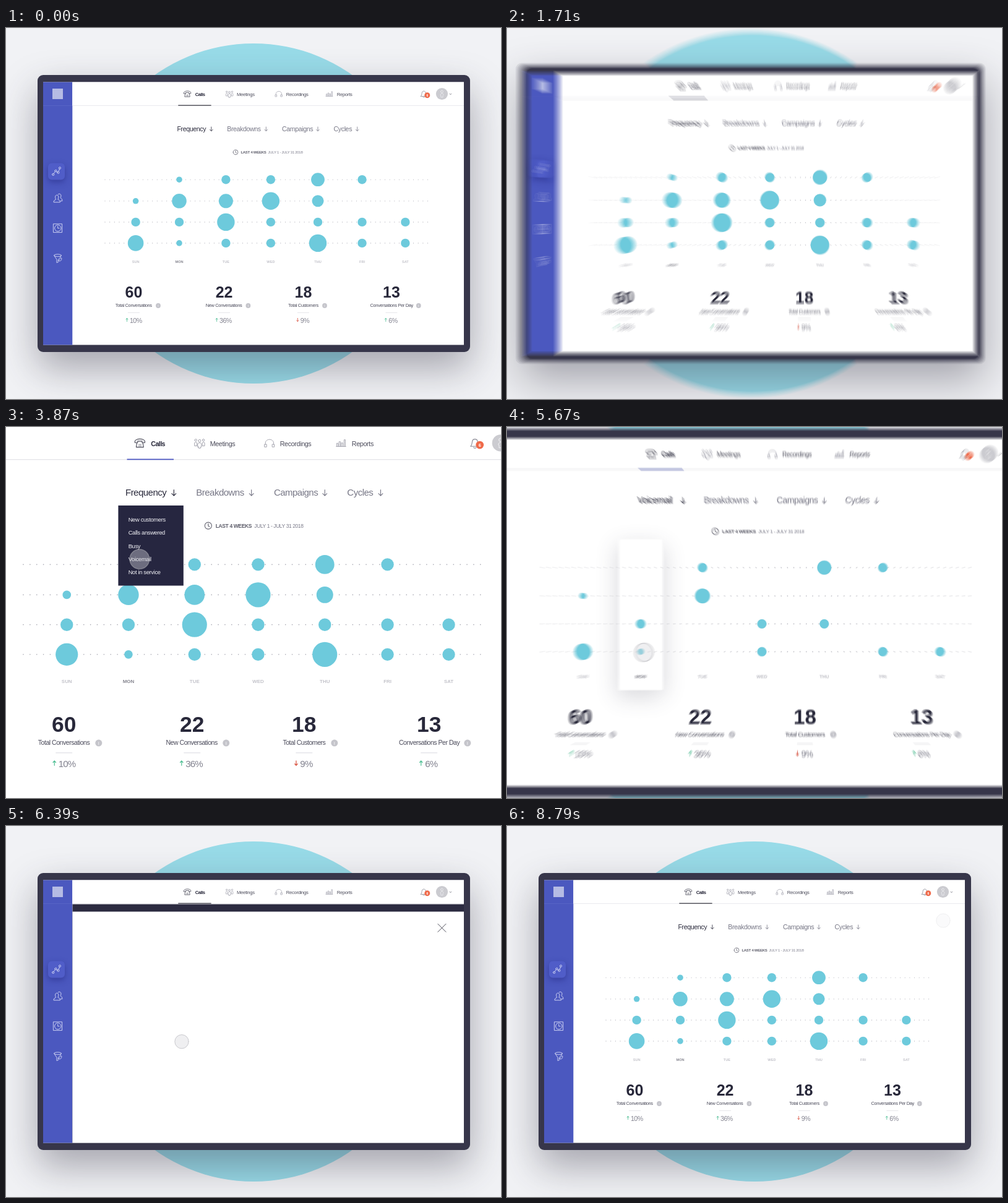
An HTML page with a canvas that plays this animation: 800 px wide and 600 px high, repeating every 8.82 s.

```html
<!DOCTYPE html>
<html lang="en">
<head>
<meta charset="utf-8">
<title>Calls dashboard</title>
<style>
  html, body { margin: 0; width: 100%; height: 100%; overflow: hidden; background: #f1f2f5; }
  canvas { display: block; width: 800px; height: 600px; }
</style>
</head>
<body>
<canvas id="stage" width="800" height="600"></canvas>
<script>
const LOOP = 8820, SHUTTER = 22, SAMPLES = 10;
const INK = '#28283a', GREY = '#7b7b8a', PALE = '#b4b4bd', TEAL = '#6dcadc';
const FONT = '"Liberation Sans", Arial, sans-serif';

const out = document.getElementById('stage').getContext('2d');
const buffer = document.createElement('canvas');
buffer.width = 800;
buffer.height = 600;
const c = buffer.getContext('2d');
let k = 1;

// Columns and rows of the bubble chart; radii before and after filtering.
const cols = [209.6, 280, 355.4, 427.9, 504, 575.5, 645.4];
const days = ['SUN', 'MON', 'TUE', 'WED', 'THU', 'FRI', 'SAT'];
const rows = [245.2, 279.8, 313.9, 347.9];
const radii = [
  [0, 4.8, 7.2, 7.2, 10.9, 7.2, 0],
  [4.8, 11.8, 11.5, 14.2, 9.5, 0, 0],
  [7.2, 7.2, 14.2, 7.2, 7.2, 7.2, 7.2],
  [12.8, 4.8, 7.2, 7.2, 14.2, 7.2, 7.2]
];
const kept = ['0010110', '1010000', '0101100', '1101011'];

const stats = [
  { n: '60', x: 206.4, label: 'Total Conversations', lx: 176.8, info: 246, pct: '10%', px: 200, up: true },
  { n: '22', x: 352.6, label: 'New Conversations', lx: 322.7, info: 391.4, pct: '36%', px: 345.1, up: true },
  { n: '18', x: 480.4, label: 'Total Customers', lx: 456.1, info: 515, pct: '9%', px: 475.8, up: false },
  { n: '13', x: 622.9, label: 'Conversations Per Day', lx: 588.5, info: 666.8, pct: '6%', px: 618.3, up: true }
];
const tabs = [['Calls', 305.7], ['Meetings', 373], ['Recordings', 452.8], ['Reports', 534.8]];
const filters = [['Frequency', 276.5, 331.8], ['Breakdowns', 357.2, 420.3], ['Campaigns', 445.9, 504], ['Cycles', 529.5, 567.7]];
const options = ['New customers', 'Calls answered', 'Busy', 'Voicemail', 'Not in service'];

const icon = {
  phone: 'M287.3 104.8c0-3.9 11.4-3.9 11.4 0v1.2h-3.2v-1.6h-5V106h-3.2zM289.7 106l-.9 5.2h8.4l-.9-5.2M292 108.2h.4M293.8 108.2h.4M292 109.8h.4M293.8 109.8h.4',
  people: 'M359.7 104a1.4 1.5 0 1 0 2.8 0a1.4 1.5 0 1 0-2.8 0M359 111v-3.4c0-1.6 4.2-1.6 4.2 0v3.4h-1v1.4h-2.2V111zM355.6 103.2a1.2 1.2 0 1 0 2.4 0a1.2 1.2 0 1 0-2.4 0M355.4 109.5v-3c0-1.3 2.7-1.3 2.7 0v3zM364.3 103.2a1.2 1.2 0 1 0 2.4 0a1.2 1.2 0 1 0-2.4 0M364.2 109.5v-3c0-1.3 2.7-1.3 2.7 0v3z',
  phones: 'M436.2 108v-1.2c0-5.8 9.4-5.8 9.4 0v1.2M435.4 108h2.2v3h-2.2zM444.2 108h2.2v3h-2.2z',
  chart: 'M517 110.5h11M517.5 110v-3.2h1.6v3.2M520.2 110v-5h1.6v5M522.9 110v-3.6h1.6v3.6M526 110v-7.2h1.4v7.2',
  bell: 'M670.3 110.3c1.7-1.6 1.6-3 1.8-4.8c.4-4.6 6-4.6 6.3 0c.1 1.8.2 3.2 1.7 4.8zM673.8 111.5c.6 1.2 2.4 1.2 3 0',
  graph: 'M77.2 235.3l2.3-3M81.9 232.2l1.5 1.1M85 231.9l1.6-4M74.6 236.9a1.6 1.6 0 1 0 3.2 0a1.6 1.6 0 1 0-3.2 0M78.9 231a1.6 1.6 0 1 0 3.2 0a1.6 1.6 0 1 0-3.2 0M82.8 233.8a1.6 1.6 0 1 0 3.2 0a1.6 1.6 0 1 0-3.2 0M85.4 226.4a1.6 1.6 0 1 0 3.2 0a1.6 1.6 0 1 0-3.2 0',
  users: 'M77 281.4c0-2.6 1.5-3 3.4-3.8c.7-.5-1-1.8-.8-4.3c.1-4.2 5.2-4.2 5.3 0c.1 2.5-1.5 3.8-.8 4.3c1.9.8 3.4 1.2 3.4 3.8zM84.3 268.9c2.8-1.9 5 .3 4.6 3c-.2 2-1 3-.4 3.4c1.7.8 2.4 1.5 2.3 4.5h-2.9',
  clock: 'M76.8 316.8h13.8v13.8H76.8zM78.5 323.7a5.2 5.2 0 1 0 10.4 0a5.2 5.2 0 1 0-10.4 0M83.7 320.6v3.3h2.6',
  funnel: 'M77.6 367.8a5.9 1.9 0 1 0 11.8 0a5.9 1.9 0 1 0-11.8 0l4.4 6.6v5.2l2.8-1.4M89.4 367.8l-2 3.4M84.2 376.6c-.2-3.4 2-4.6 5.6-4.6c.4 4-1.8 5.6-5.6 4.6l2.8-2.4',
  date: 'M367.1 200.9a3.9 3.9 0 1 0 7.8 0a3.9 3.9 0 1 0-7.8 0M371 198.6v2.5l1.5.9',
  person: 'M702.6 102.9a1.9 2 0 1 0 3.8 0a1.9 2 0 1 0-3.8 0M702 108.4c0-3.6 5-3.6 5 0l-.9 1v2.6h-3.2v-2.6z',
  chevron: 'M717 106.4l1.4 1.1l1.4-1.1'
};
for (const name in icon) icon[name] = new Path2D(icon[name]);

// Cursor moves: start, duration, target.
const start = [218, 339];
const moves = [
  [2200, 343, 302.5, 164.5], [3000, 650, 292.6, 239.1],
  [4300, 600, 284, 348.7], [6780, 680, 705, 153]
];

const clamp = v => Math.max(0, Math.min(1, v));
const mix = (a, b, u) => a + (b - a) * u;
const ramp = (t, from, len) => clamp((t - from) / len);
function ease(t, from, len, power = 3) {
  const u = ramp(t, from, len);
  return u < .5 ? .5 * (2 * u) ** power : 1 - .5 * (2 - 2 * u) ** power;
}
const zoomAt = t => ease(t, 1553, 400, 5) - ease(t, 5394, 680, 4);

function text(str, x, y, size, color, weight = 400, track = -.035, align = 'left') {
  c.font = `${weight} ${size}px ${FONT}`;
  c.letterSpacing = track * size + 'px';
  c.textAlign = align;
  c.fillStyle = color;
  c.fillText(str, x, y);
}
function rect(x, y, w, h, color, r = 0) {
  c.fillStyle = color;
  c.beginPath();
  c.roundRect(x, y, w, h, r);
  c.fill();
}
function disc(x, y, r, color) {
  c.fillStyle = color;
  c.beginPath();
  c.arc(x, y, r, 0, 7);
  c.fill();
}
function line(path, color, width = .7) {
  c.strokeStyle = color;
  c.lineWidth = width;
  c.stroke(typeof path === 'string' ? new Path2D(path) : path);
}
function shadow(color, blur = 0, dy = 0) {
  c.shadowColor = color;
  c.shadowBlur = blur * k;
  c.shadowOffsetY = dy * k;
}
const noShadow = () => shadow('transparent');

function device() {
  c.fillStyle = '#f1f2f5';
  c.fillRect(-400, -400, 1600, 1400);
  disc(400, 300, 275, '#98dbe8');
  shadow('rgba(50,48,66,.4)', 62, 26);
  rect(51, 76, 699, 448, '#37364a', 9);
  noShadow();
  rect(60, 87.4, 680, 425.1, '#fff');
}

function sidebar() {
  rect(60, 87.4, 47.3, 425.1, '#4b58bf');
  rect(60, 125.2, 47.3, .6, '#6470cb');
  rect(75, 98, 17, 17, '#b5bbe4');
  shadow('rgba(35,40,130,.5)', 10, 4);
  rect(68, 218.5, 27, 27, '#505dc8', 6);
  noShadow();
  for (const name of ['graph', 'users', 'clock', 'funnel']) line(icon[name], '#d9dcf6', .9);
}

function header(zoom) {
  rect(107.3, 87.4, 632.7, 38, '#fff');
  rect(107.3, 125, 632.7, .8, '#e3e3e8');
  const tone = [[51, 74], [51, 85], [62, 192]].map(([a, b]) => mix(a, b, zoom));
  rect(278.3, 124.6, 53.3, 1.2, `rgb(${tone})`);
  line(icon.phone, '#4a4a58', .8);
  for (const name of ['people', 'phones', 'chart']) line(icon[name], '#a3a3ae');
  tabs.forEach(([name, x], i) => text(name, x, 109.8, 7.6, i ? '#4b4b5a' : INK, i ? 400 : 700, i ? -.035 : -.06));
  line(icon.bell, '#8a8a95', .8);
  disc(680.8, 108.7, 4.5, '#ef6a4a');
  text('6', 680.9, 110.5, 5, '#fff', 700, 0, 'center');
  disc(704.5, 106.5, 9.6, '#cbcbd0');
  line(icon.person, '#f3f3f5');
  line(icon.chevron, '#555563');
}

function chart(filtered, card) {
  if (card > 0) {
    c.globalAlpha = card;
    shadow('rgba(70,70,90,.2)', 26, 8);
    rect(253, 210.3, 54.4, 184.7, '#fff', 2);
    noShadow();
    c.globalAlpha = 1;
  }
  c.lineCap = 'round';
  c.setLineDash([.01, 7.66]);
  for (const y of rows) line(`M160 ${y}H682`, '#a9a9b3', 1.15);
  c.setLineDash([]);
  rows.forEach((y, j) => cols.forEach((x, i) => {
    const r = radii[j][i];
    const size = mix(r, kept[j][i] === '1' ? r * .79 : 0, filtered);
    if (size > 0) disc(x, y, size, TEAL);
  }));
  days.forEach((day, i) => text(day, cols[i], 380.2, 5.6, i === 1 ? '#85858f' : '#c3c3ca', 700, 0, 'center'));
}

function page(t, voicemail) {
  filters.forEach(([name, x, ax], i) => {
    const color = i ? '#777786' : INK;
    text(i || !voicemail ? name : 'Voicemail', x, 166.6, 10.6, color);
    line(`M${ax} 160v6.6M${ax - 2.4} 164.2l2.4 2.5l2.4-2.5`, color, .8);
  });
  line(icon.date, '#62626f', .8);
  text('LAST 4 WEEKS', 379.4, 203, 6, '#5c5c69', 700, -.045);
  text('JULY 1 - JULY 31 2018', 423.6, 203, 6, GREY, 400, -.05);

  const live = t < 7000;
  chart(live ? ease(t, 4000, 480) : 0, live ? ease(t, 4800, 300) : 0);

  for (const s of stats) {
    text(s.n, s.x, 436.2, 25, INK, 700, 0, 'center');
    text(s.label, s.lx, 451.4, 7.45, '#4a4a5a', 400, -.045);
    disc(s.info, 449, 3.9, '#c5c5cb');
    text('i', s.info, 450.8, 5, '#eeeef1', 700, 0, 'center');
    rect(s.x - 9.5, 459.8, 19, .8, '#dddde3');
    text(s.pct, s.px, 476.8, 10.6, '#82828f', 400, -.05);
    const x = s.px - 4.5, head = s.up ? 469.4 : 474.6, d = s.up ? 1.8 : -1.8;
    line(`M${x} 469.4v5.2M${x - 1.6} ${head + d}L${x} ${head}L${x + 1.6} ${head + d}`, s.up ? '#4fbf94' : '#d8513f', .85);
  }
}

function dropdown(t) {
  const open = ease(t, 2580, 330) - ease(t, 3960, 240);
  if (open <= 0) return;
  c.save();
  c.beginPath();
  c.rect(268.2, 177.7, 74.6, 91.8 * open);
  c.clip();
  rect(268.2, 177.7, 74.6, 91.8, '#262640');
  options.forEach((name, i) => text(name, 279.8, 196.2 + 15.05 * i, 6.6, '#f4f4f8'));
  c.restore();
}

// Dark sheet followed by the white one, up and then down again.
function panel(t) {
  const down = ease(t, 7660, 600, 4);
  const dark = ease(t, 5880, 590, 4) - down;
  const white = ease(t, 5950, 590, 4) - down;
  if (dark <= 0) return;
  c.save();
  c.beginPath();
  c.rect(107.3, 125.6, 632.7, 386.9);
  c.clip();
  rect(107.3, 512.5 - 386.9 * dark, 632.7, 387, '#2c2b40');
  const top = 512.5 - 386.5 * white;
  rect(107.3, top, 632.7, 387, '#fff');
  line(`M698 ${top + 19.8}l13 13m0-13l-13 13`, '#3a3a48', .9);
  c.restore();
}

function cursor(t) {
  const alpha = ramp(t, 2220, 120) * mix(1, .28, ramp(t, 8200, 280));
  if (alpha <= 0) return;
  let [x, y] = start;
  for (const [from, len, tx, ty] of moves) {
    const u = ease(t, from, len);
    x = mix(x, tx, u);
    y = mix(y, ty, u);
  }
  c.globalAlpha = alpha;
  disc(x, y, 11.2, 'rgba(215,215,220,.4)');
  c.strokeStyle = 'rgba(165,165,172,.6)';
  c.lineWidth = .9;
  c.stroke();
  c.globalAlpha = 1;
}

function scene(t) {
  const zoom = zoomAt(t);
  k = 1 + .4165 * zoom;
  c.setTransform(k, 0, 0, k, 477 * (1 - k), 300 * (1 - k));
  c.lineJoin = 'round';
  device();
  sidebar();
  page(t, t > 3990 && t < 7000);
  dropdown(t);
  header(zoom);
  panel(t);
  cursor(t);
}

function frame() {
  const t = performance.now() % LOOP;
  const moving = zoomAt(t - SHUTTER) !== zoomAt(t + SHUTTER);
  const count = moving ? SAMPLES : 1;
  for (let i = 0; i < count; i++) {
    scene(moving ? t + SHUTTER * ((i + .5) / count - .5) : t);
    out.globalAlpha = 1 / (i + 1);
    out.drawImage(buffer, 0, 0);
  }
  requestAnimationFrame(frame);
}
frame();
</script>
</body>
</html>
```
